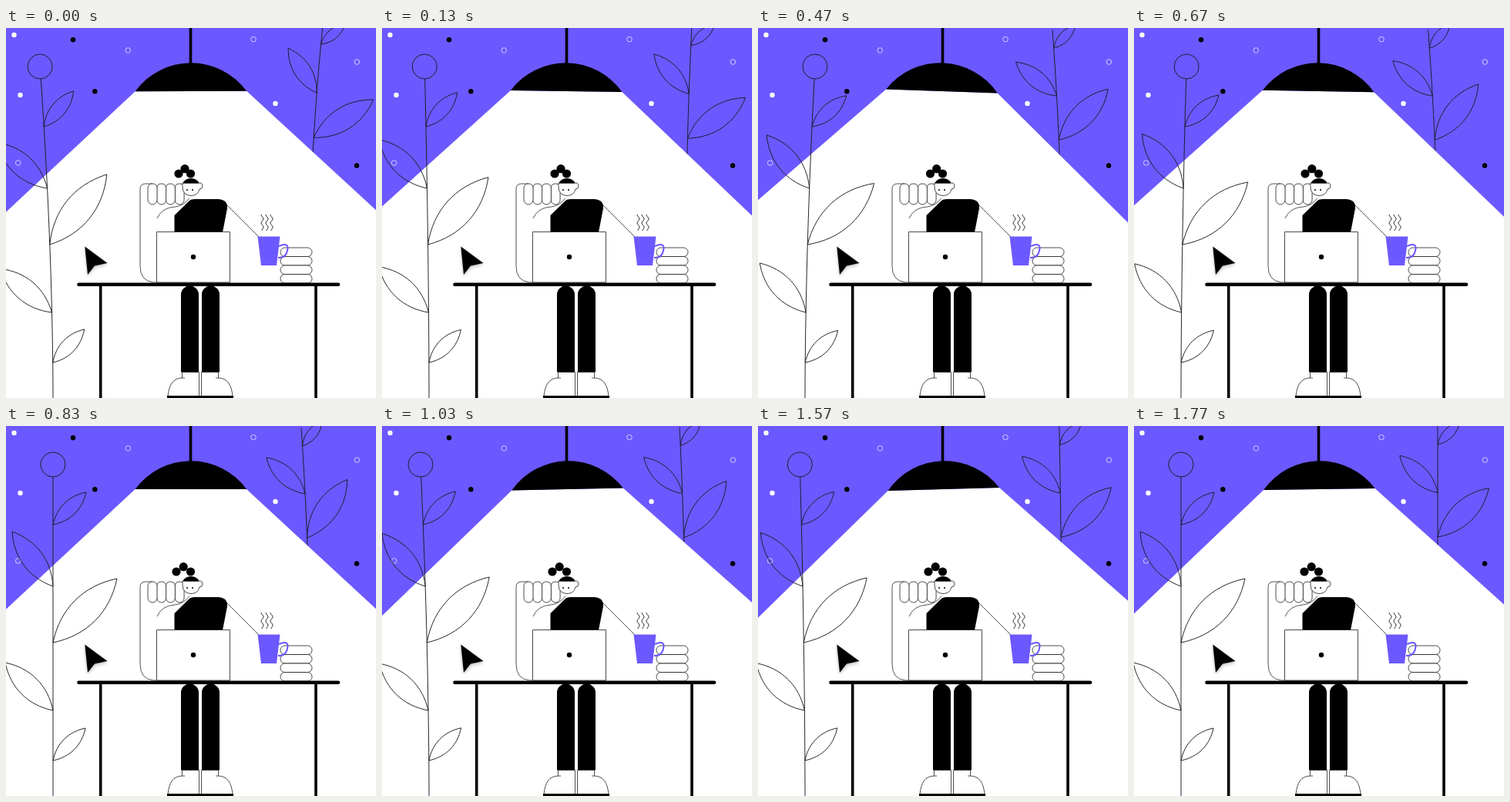
An HTML page for the animation above (1.81 s loop, 480 by 480 pixels).

```html
<!DOCTYPE html>
<html lang="en">
<head>
<meta charset="utf-8">
<title>Desk under a lamp</title>
<style>
  html, body { margin: 0; width: 100%; height: 100%; overflow: hidden; background: #6c58ff; }
  svg { display: block; width: 100vw; height: 100vh; }
  .line { fill: none; stroke: #1c1c24; stroke-width: .95; stroke-linejoin: round; }
  .paper { fill: #fff; stroke: #111; stroke-width: .75; stroke-linejoin: round; }
  .thin { stroke-width: .75; }
  .ring { fill: none; stroke: #fff; stroke-width: .8; stroke-opacity: .85; }
</style>
</head>
<body>
<svg viewBox="0 0 480 480">
  <rect width="480" height="480" fill="#6c58ff"/>
  <g id="dots"></g>
  <path id="right" class="line"/>

  <path d="M239.500 0V50" stroke="#000" stroke-width="3.600"/>
  <g id="lamp">
    <path d="M167.500 82L-132.500 360V900H612V360L312 82Z" fill="#fff"/>
    <path d="M167.500 82A89.500 89.500 0 0 1 312 82Z"/>
  </g>
  <path id="left" class="line"/>
  <circle id="bud" class="line" r="16"/>

  <!-- raised arm and fist -->
  <path class="line thin" d="M290 330H191Q174 328 174 309V209Q174 202 181 202H190"/>
  <path class="line thin" d="M196 247Q202 233 219 232Q230 231 238 221"/>
  <g id="fingers" class="paper"></g>

  <!-- head -->
  <path class="paper" d="M229 201H252Q255 201.500 255 205Q255 209 251 209Q249 217.500 240 217.500Q229 217 229 206Z"/>
  <path d="M229.500 201.500Q232 195 240 195Q248 195 250.500 201.500Z"/>
  <circle cx="235" cy="210" r="1"/>
  <circle cx="242" cy="210" r="1"/>
  <g id="hair"></g>

  <!-- body, arm and laptop -->
  <path d="M218.500 265V243L238 224Q240 222 245 222H276Q288 223 287 234L281 265Z"/>
  <path class="line thin" d="M286 229L328 271"/>
  <rect class="paper" x="195.500" y="264.500" width="95" height="65.500"/>
  <circle cx="243" cy="297" r="3.200"/>

  <!-- books, mug and steam -->
  <g id="books" class="paper"></g>
  <path d="M326.500 270.500H355.500L351 308H331Z" fill="#6c58ff"/>
  <path d="M354 283Q366 278 365.500 286Q364 299 353 298" fill="none" stroke="#6c58ff" stroke-width="2"/>
  <g id="steam" class="line"></g>

  <!-- legs and shoes -->
  <path d="M227 446.500V346A11.500 11.500 0 0 1 250 346V446.500ZM254 446.500V346A11.500 11.500 0 0 1 277 346V446.500Z"/>
  <g id="shoe">
    <path class="paper" d="M228.500 446.500V454Q212 454 210 478H250.500V446.500Z"/>
    <path class="line thin" d="M228.500 454H232"/>
  </g>
  <use href="#shoe" transform="matrix(-1 0 0 1 504 0)"/>
  <path d="M209 478.500H295" stroke="#000" stroke-width="2.800"/>

  <!-- table -->
  <path d="M122.700 333V480M402 333V480" stroke="#000" stroke-width="3.600"/>
  <path d="M94.500 332.800H431" stroke="#000" stroke-width="4.600" stroke-linecap="round"/>

  <path d="M102.300 283.500L131.500 305L115 308.500L106 320Z" style="filter:drop-shadow(0 2px 2px #0004)"/>
</svg>
<script>
const $ = id => document.getElementById(id);
const LOOP = 1810;
const TIMES = [0, 270, 470, 830, 1030, 1370, 1770];
const TRACKS = {
  lamp: [-.2, 1.65, 1.97, -.05, -1.2, -1.97, -.85],
  leftBend: [-17, 5, 13, 0, -11, -12, 0],
  leftOuter: [-11, -4.7, -2, 0, -2.5, -2.5, 0],
  leftInner: [-5.9, -.3, 2.4, 0, -1.4, -1.4, 0],
  rightBend: [17, -1.5, -12, -11, -8, -6, 0],
  rightOuter: [5.9, 0, -7.5, -17, -14.6, -8, -5.3],
  rightInner: [16.6, 0, -1.2, 2.3, 2.3, 2.3, 3.5],
  hair: [0, 0, -.5, -3, -3, -3, -3]
};

// Smooth curve through a track's keys
function sample(name, t) {
  const v = TRACKS[name], last = TIMES.length - 1;
  if (t >= TIMES[last]) return v[last];
  const i = TIMES.findLastIndex(k => k <= t);
  const slope = k => {
    const a = Math.max(k - 1, 0), b = Math.min(k + 1, last);
    return (v[b] - v[a]) / (TIMES[b] - TIMES[a]);
  };
  const h = TIMES[i + 1] - TIMES[i], u = (t - TIMES[i]) / h, w = 1 - u;
  return w * w * (1 + 2 * u) * v[i] + u * u * (3 - 2 * u) * v[i + 1]
    + h * u * w * (w * slope(i) - u * slope(i + 1));
}

// Stem point at rest height y, bent by `bend` at the top
function bentStem(x, root, top, bend, lift) {
  return y => {
    const k = Math.max(0, (root - y) / (root - top));
    return [x + bend * k ** 1.8, y - lift * bend * k];
  };
}

function stemPath(at, from, to) {
  let d = "M" + at(from);
  for (let y = from + 10; y < to; y += 10) d += "L" + at(y);
  return d + "L" + at(to);
}

// Almond leaf from a base along (dx, dy), turned by `deg`
function leaf([x, y], dx, dy, deg) {
  const a = deg * Math.PI / 180, c = Math.cos(a), s = Math.sin(a);
  const vx = dx * c - dy * s, vy = dx * s + dy * c;
  const p = (u, w) => [x + vx * u - vy * w, y + vy * u + vx * w];
  const side = w => `M${p(0, 0)}C${p(.32, w)} ${p(.68, w)} ${p(1, 0)}`;
  return side(-.21) + side(.21);
}

function drawLeft(t) {
  const bend = sample("leftBend", t), out = sample("leftOuter", t), inn = sample("leftInner", t);
  const at = bentStem(61, 480, 50, bend, 0);
  $("left").setAttribute("d", stemPath(at, 66, 480)
    + leaf(at(128), 43, -42, inn)
    + leaf(at(208), -53, -71, out)
    + leaf(at(281), 83, -83, inn)
    + leaf(at(369), -62, -62, inn * .8)
    + leaf(at(434), 42, -42, inn * .25));
  const [x, y] = at(50);
  $("bud").setAttribute("cx", x);
  $("bud").setAttribute("cy", y);
}

function drawRight(t) {
  const bend = sample("rightBend", t), out = sample("rightOuter", t), inn = sample("rightInner", t);
  const at = bentStem(394, 300, 0, bend, .19);
  $("right").setAttribute("d", stemPath(at, 0, 200)
    + leaf(at(24), 30, -28, out * .5)
    + leaf(at(86.5), -52, -45, inn)
    + leaf(at(144), 72, -57, out));
}

function circle(x, y, r, extra = "") {
  return `<circle cx="${x}" cy="${y}" r="${r}" ${extra}/>`;
}

$("dots").innerHTML =
  [[10.5, 9], [18.5, 87], [349.5, 98]].map(([x, y]) => circle(x, y, 3.2, 'fill="#fff"')).join("") +
  [[87, 15.3], [115.3, 82.3], [455, 178.5]].map(([x, y]) => circle(x, y, 3.2)).join("") +
  [[158.3, 29], [321, 14.7], [455.3, 44], [15.7, 175]].map(([x, y]) => circle(x, y, 3.3, 'class="ring"')).join("");

$("fingers").innerHTML = [3, 2, 1, 0].map(i =>
  `<path transform="translate(${184 + i * 11.7})" d="M0 208Q0 202 6 202T12 208V223A6 6 0 0 1 0 223Z"/>`).join("");

$("books").innerHTML = [0, 1, 2, 3].map(i =>
  `<rect x="356" y="${285 + i * 11.5}" width="41" height="11.5" rx="5.7"/>`).join("");

$("steam").innerHTML = [331, 337, 343].map(x =>
  `<path d="M${x} 242c0 3 3 3 3 5.500s-3 3 -3 5.500 3 3 3 5.500-2 2-2 4.500"/>`).join("");

$("hair").innerHTML = circle(224, 189, 5.6) + circle(232, 182.7, 5.6) + circle(239.5, 189, 5.6);
const [bunA, bunB] = $("hair").children;

function frame() {
  const t = performance.now() % LOOP;
  $("lamp").setAttribute("transform", `rotate(${sample("lamp", t)} 240 42)`);
  drawLeft(t);
  drawRight(t);
  const sway = sample("hair", t);
  bunA.setAttribute("cx", 224 + sway);
  bunB.setAttribute("cx", 232 + sway * .6);
  requestAnimationFrame(frame);
}
frame();
</script>
</body>
</html>
```
